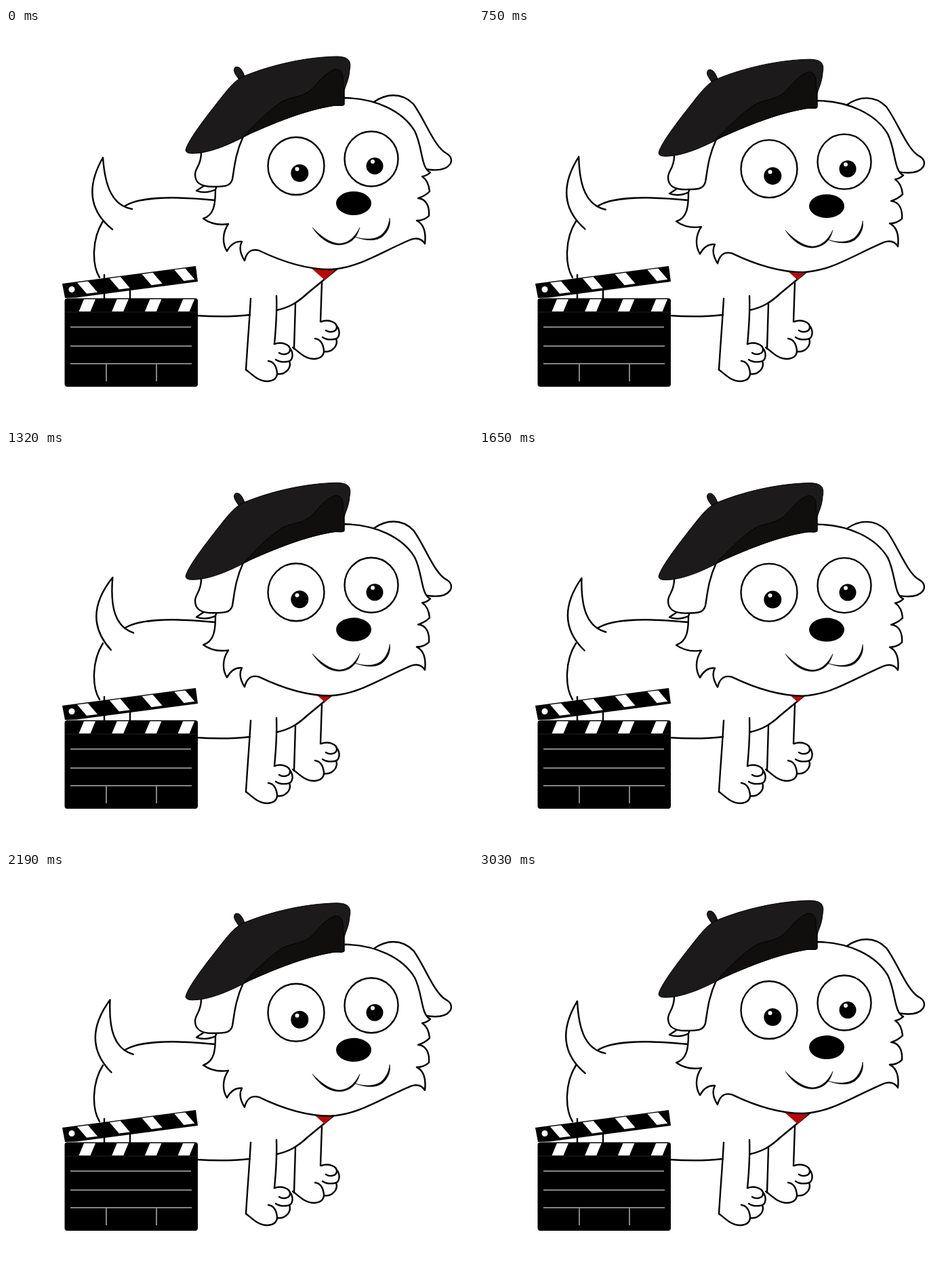
These frames come from a looping animation (689 by 581 pixels, 3060 ms). An HTML page:

```html
<!DOCTYPE html>
<html>
<head>
<meta charset="utf-8">
<style>
  html, body { margin: 0; width: 100%; height: 100%; overflow: hidden; background: #fff; }
  svg { display: block; }
  .line { fill: none; stroke: #000; stroke-width: 2.4; stroke-linecap: round; stroke-linejoin: round; }
  .skin { fill: #fff; }
  .rule { fill: none; stroke: #858585; stroke-width: 2; }
</style>
</head>
<body>
<svg width="689" height="581" viewBox="0 0 689 581">
  <defs>
    <path id="foot" d="M396 466C407 462 419 467 419 474C419 481 409 483 403 479M418 471C425 479 424 491 415 492C408 493 402 492 398 489M418 491C422 502 411 512 400 510M354 504C363 510 371 521 386 521C396 520 400 515 400 509C399 498 394 492 387 491"/>
  </defs>

  <!-- body and legs -->
  <g class="line">
    <path d="M172 265C190 250 240 247 309 254M143 285C126 312 127 350 138 368M145 364V402M183 384V402M280 424Q325 427 360 423"/>
    <path d="M490 354L445 391C430 405 418 412 400 416M361 399C359 435 356 470 354 504M399 395C400 420 398 445 396 466M427 407L425 473M466 375L464 433"/>
    <use href="#foot"/>
    <use href="#foot" x="69" y="-33"/>
  </g>
  <path id="tail" class="line skin" d="M157 297C122 269 119 233 143 191C146 234 157 262 186 267"/>

  <!-- clapperboard -->
  <rect x="86.5" y="398.5" width="196.500" height="130.500" rx="4"/>
  <path d="M87 419H282" stroke="#222"/>
  <path d="M83 377L280 351L283 374L104 397.500L87 398Z"/>
  <g id="stripes" fill="#fff"></g>
  <circle cx="97" cy="385.500" r="4.500" fill="#fff"/>
  <path class="rule" d="M95 441H273M95 469H274M95 495H274M148 495V521M222 495V521"/>

  <path d="M448 352H492L470 371.500Z" fill="#b90808"/>

  <g id="head">
    <path class="line skin" d="M543 109C560 97 583 94 601 112C618 135 632 176 650 185C664 193 657 212 626 209L600 206Z"/>
    <path class="line skin" d="M293 232L281 240Q294 245 310 238"/>
    <path class="line skin" d="M309 238C309 260 307 276 291 281C302 289 315 291 328 289C319 302 319 318 326 329C332 318 339 314 348 315C343 324 347 335 352 343C355 331 361 325 373 328C400 341 440 356 478 356C520 354 550 332 597 312Q611 307 618 318C620 300 616 289 606 284Q617 284 624 277C625 263 620 252 608 251Q618 248 625 241C624 230 620 223 614 219Q621 218 626 213C612 207 615 176 603 152C585 122 545 104 500 103L350 140Z"/>
    <path class="line skin" d="M288 184C288 203 279 206 279 216C279 229 288 234 305 234C322 234 331 234 334 223C337 206 338 186 350 160"/>
    <g class="line skin">
      <ellipse cx="428" cy="203.500" rx="41.500" ry="42.500"/>
      <ellipse cx="539" cy="193" rx="39.500" ry="40.500"/>
    </g>
    <circle cx="433.300" cy="214" r="13"/>
    <circle cx="544" cy="203.500" r="12.500"/>
    <g fill="#fff">
      <circle cx="429.500" cy="208" r="3"/>
      <circle cx="541" cy="197" r="3"/>
    </g>
    <ellipse cx="513" cy="258.500" rx="26" ry="17.500"/>
    <path d="M452 294C464 307 478 317 492 318C506 317 515 308 522 294C518 310 508 319 492 320C477 320 462 310 452 294ZM515 308C530 313 547 312 555 304C562 297 565 289 566 280C568 290 564 300 556 307C547 315 530 314 515 308Z" stroke="#000" stroke-width=".5"/>
    <g stroke="#000" stroke-linejoin="round">
      <path fill="#1c1a1b" d="M343 75C339 69 334 63 338 58C344 55 349 62 352 71Z"/>
      <path fill="#1c1a1b" d="M265 180C268 165 300 125 318 102C330 87 338 77 351 71C390 55 440 43 487 42C505 42 510 48 507 62C506 78 500 85 499 94V113C495 116 490 113 480 115C440 122 400 138 360 156C330 172 300 185 275 185Q265 185 265 180Z"/>
      <path fill="#100f0d" d="M350 160C368 141 385 124 405 110C418 101 436 103 449 92C460 82 470 66 485 61C497 60 498 72 497 80L499 95V113C495 116 490 113 480 115C440 122 400 138 350 160Z"/>
    </g>
  </g>
</svg>
<script>
  const $ = id => document.getElementById(id);

  let stripes = '';
  for (let i = 0; i < 4; i++) {
    const x = 115 + 48.7 * i, sx = 105 + 47.8 * i, sy = 375.5 - 6.3 * i;
    stripes += `<path d="M${x} 400h17l-7.500 18h-17zM${sx} ${sy}l16 -2.100l14 16.300l-16 2.100z"/>`;
  }
  $('stripes').innerHTML = stripes;

  // Head sinks with a quick start, then rises smoothly.
  function headDrop(t) {
    const p = t % 1020 / 510;
    return 7.6 * (p < 1 ? p * (2 - p) : (1 + Math.cos((p - 1) * Math.PI)) / 2);
  }

  // Two wags, each with a steady swing out and back: [time, degrees].
  const wags = [[0, 0], [405, 17.6], [810, 0], [1140, 16.4], [1530, 0]];
  function tailAngle(t) {
    t %= 1530;
    const i = wags.findIndex(w => w[0] > t);
    const [t0, a] = wags[i - 1], [t1, b] = wags[i];
    return a + (b - a) * (t - t0) / (t1 - t0);
  }

  const start = performance.now();
  function draw() {
    const t = Math.floor((performance.now() - start) / 30) * 30 % 3060;
    $('head').setAttribute('transform', `translate(0 ${headDrop(t)})`);
    $('tail').setAttribute('transform', `rotate(${tailAngle(t)} 170 282)`);
    requestAnimationFrame(draw);
  }
  draw();
</script>
</body>
</html>
```
